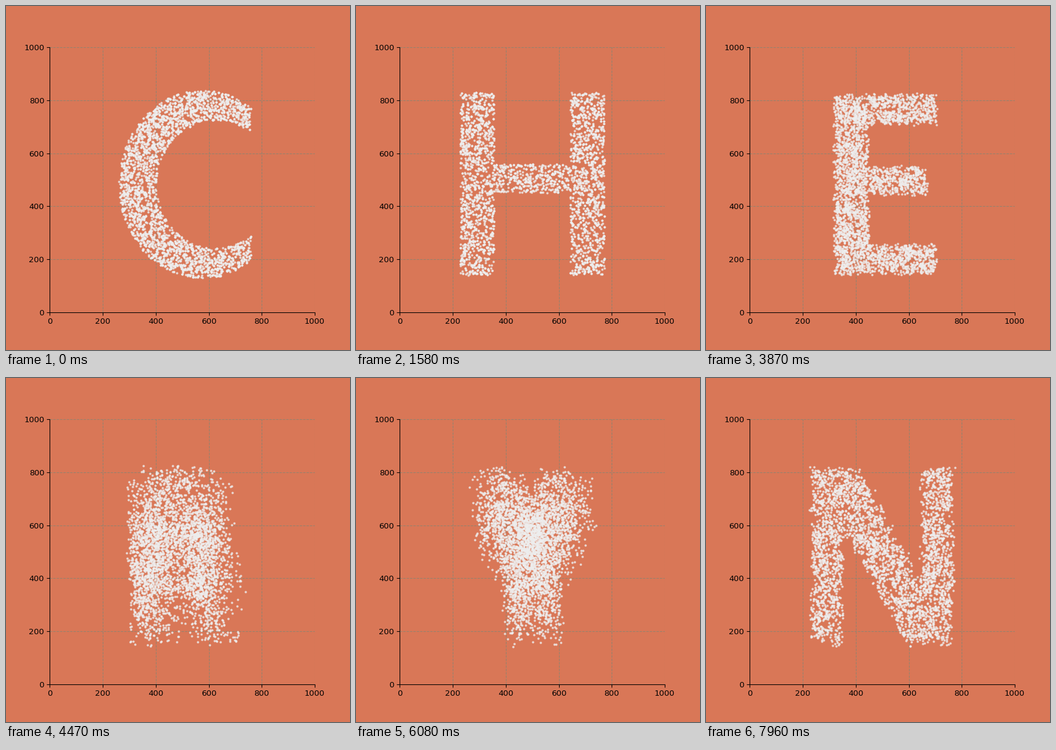
These frames come from a looping animation (576 by 576 pixels, 7.99 s). A matplotlib script:

```python
import numpy as np
import matplotlib.pyplot as plt
from matplotlib.animation import FuncAnimation

BACKGROUND = "#D97757"
DOT = "#EEEEEE"
GRID = "#94836F"

LOOP, INTERVAL = 7990, 17
HOLD, STEP, STEPS = 650, 30, 32
PERIOD = HOLD + STEP * STEPS

DOTS, DISTINCT = 3700, 2400
BASE, CAP = 138, 828
MID = (BASE + CAP) / 2


def between(value, low, high):
    return (low < value) & (value < high)


def oval(x, y, rx, ry, power=2):
    return np.abs(x / rx) ** power + np.abs(y / ry) ** power < 1


def letter_c(x, y):
    outer = oval(x - 575, y - MID, 316, 354)
    inner = oval(x - 625, y - MID, 223, 242)
    return outer & ~inner & (x < 759)


def letter_h(x, y):
    side = abs(x - 500)
    return between(side, 144, 272) | (side < 272) & between(y, 450, 558)


def letter_e(x, y):
    stem = x < 443
    outer_bars = (abs(y - MID) > 240) & (x < 708)
    middle_bar = between(y, 447, 547) & (x < 670)
    return (x > 315) & (stem | outer_bars | middle_bar)


def letter_r(x, y):
    stem = x < 402
    center = (419 + CAP) / 2
    outer = oval(np.maximum(x - 500, 0), y - center, 236, CAP - center, 2.5)
    inner = oval(np.maximum(x - 470, 0), y - center, 127, 101, 2.5)
    leg = (abs(x - 620 - 0.37 * (370 - y)) < 69) & (y < 450)
    return (x > 273) & (stem | outer & ~inner | leg)


def letter_y(x, y):
    side = abs(x - 500)
    arms = abs(side - 199 + 0.48 * (CAP - y)) < 73
    return arms | (side < 64) & (y < 450)


def letter_n(x, y):
    side = abs(x - 500)
    diagonal = abs(x - 500 + 0.549 * (y - MID)) < 90
    return between(side, 163, 279) | diagonal


rng = np.random.default_rng(12)


def cloud(letter):
    """Random dots inside a letter, some of them doubled, in random order."""
    x, y = rng.uniform(100, 900, (2, 24000))
    inside = letter(x, y)
    if letter is not letter_c:  # the round letter overshoots both lines
        inside &= between(y, BASE, CAP)
    distinct = np.column_stack([x, y])[inside][:DISTINCT]
    extra = rng.choice(distinct, DOTS - len(distinct))
    return rng.permutation(np.vstack([distinct, extra]))


clouds = [cloud(letter) for letter in
          (letter_c, letter_h, letter_e, letter_r, letter_y, letter_n)]

fig, ax = plt.subplots(figsize=(6, 6), dpi=96, facecolor=BACKGROUND)
ax.set_facecolor(BACKGROUND)
ax.set_aspect("equal")
ax.set(xlim=(0, 1000), ylim=(0, 1000))
ax.set_xticks(range(0, 1001, 200))
ax.set_yticks(range(0, 1001, 200))
ax.set_axisbelow(True)
ax.grid(color=GRID, linestyle="--", linewidth=0.8)
ax.spines[["top", "right"]].set_visible(False)

dots, = ax.plot([], [], "o", color=DOT, alpha=0.8, markersize=2.9,
                markeredgewidth=0)


def update(frame):
    index, local = divmod(frame * INTERVAL + INTERVAL - 1, PERIOD)
    step = 0 if local < HOLD else (local - HOLD) // STEP + 1
    start, end = clouds[index:index + 2]
    dots.set_data(*(start + (end - start) * step / STEPS).T)
    return dots,


anim = FuncAnimation(fig, update, frames=LOOP // INTERVAL, interval=INTERVAL,
                     repeat=True, repeat_delay=0)
plt.show()
```
